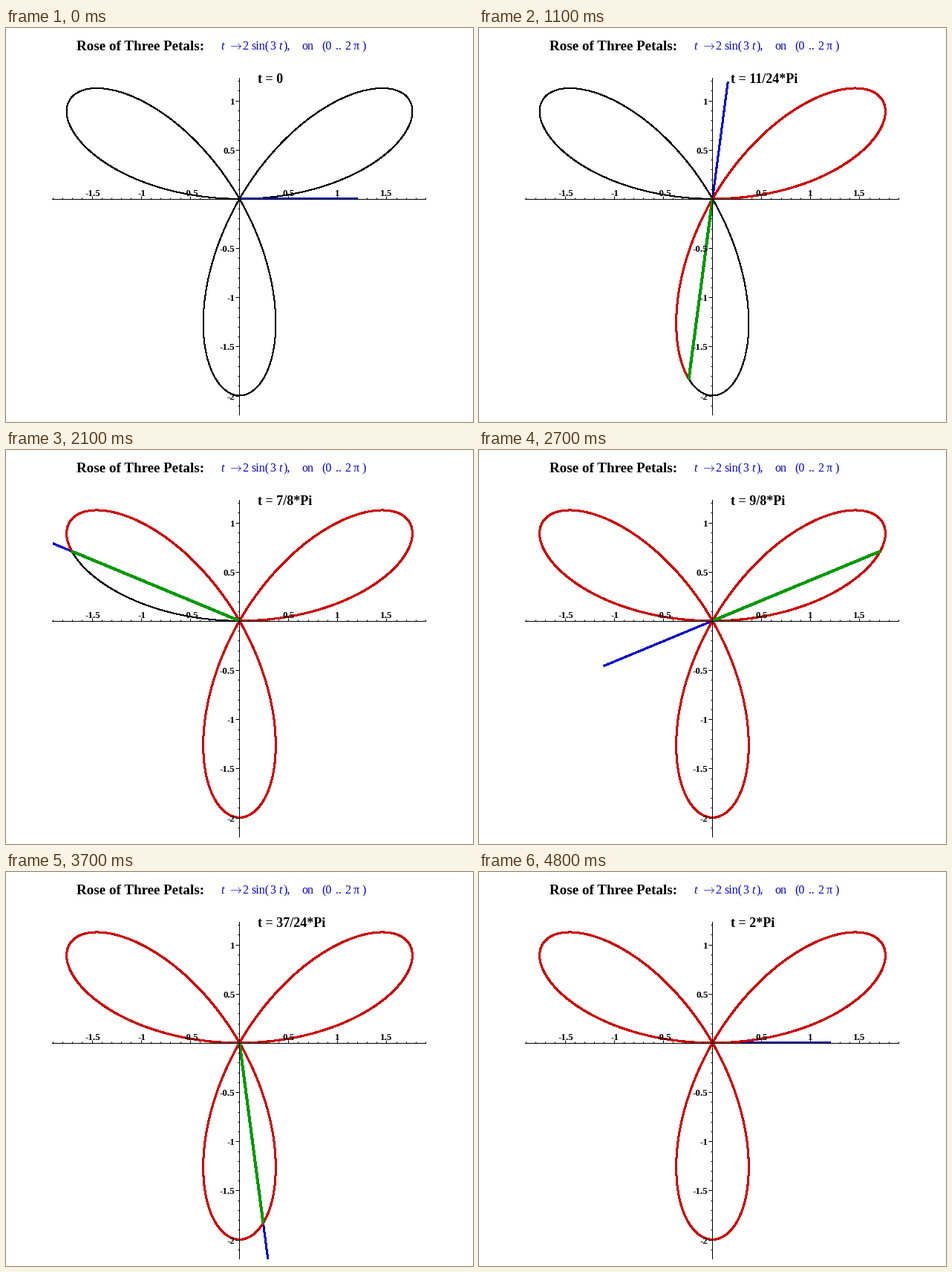
A matplotlib script that plays this animation: 629 px wide and 530 px high, repeating every 4.9 s.

```python
import math

import matplotlib.pyplot as plt
import numpy as np
from matplotlib.animation import FuncAnimation
from matplotlib.patches import Rectangle

W, H, DPI = 629, 530, 64
PT = 72 / DPI                      # points per pixel
CX, CY, UNIT = 314.5, 229.8, 132.3
LEFT, RIGHT, TOP, BOTTOM = 62, 566, 67, 521
STEPS = 24                         # steps per half turn
RED, GREEN, BLUE = "#cc0000", "#009900", "#0000cc"

plt.rcParams.update({
    "font.family": "Liberation Serif",
    "mathtext.fontset": "cm",
})

fig = plt.figure(figsize=(W / DPI, H / DPI), dpi=DPI, facecolor="white")
ax = fig.add_axes([0, 0, 1, 1])
ax.set(xlim=(0, W), ylim=(H, 0))
ax.axis("off")


def radius(t):
    return 2 * np.sin(3 * t)


def to_px(r, t):
    return CX + UNIT * r * np.cos(t), CY - UNIT * r * np.sin(t)


def rose(end):
    t = np.linspace(0, end, 2 + int(end * 100))
    return to_px(radius(t), t)


def stroke(width, color, z):
    # Aliased strokes cover every touched pixel, so they look 1 px wider.
    line, = ax.plot([], [], color=color, lw=width * PT, zorder=z,
                    antialiased=False, snap=False, solid_capstyle="butt",
                    solid_joinstyle="round")
    return line


def label(x, y, s, size, **kw):
    return ax.text(x, y, s, fontsize=size * PT, va="baseline", zorder=7, **kw)


def draw_axes():
    style = dict(color="black", lw=PT, zorder=6, snap=False)
    x0, y0 = 314.5, 230.5
    ax.hlines(y0, LEFT, RIGHT, **style)
    ax.vlines(x0, TOP, BOTTOM, **style)
    for k in range(-21, 20):
        if k == 0:
            continue
        major = k % 5 == 0
        size = 4 if major else 2
        x = round(314 + k * UNIT / 10) + 0.5
        y = round(230 - k * UNIT / 10) + 0.5
        if abs(k) < 20:
            ax.vlines(x, y0 - size, y0, **style)
            if major:
                label(x, 226, f"{k / 10:g}", 13, ha="center", weight="bold")
        if k <= 12:
            ax.hlines(y, x0 - size - major, x0, **style)
            if major:
                label(308.5, y + 4.5, f"{k / 10:g}", 13, ha="right",
                      weight="bold")


def draw_heading():
    label(95, 30, "Rose of Three Petals:", 19, weight="bold")
    parts = [(289, "t"), (299, r"$\rightarrow$"), (318, "2"), (330, "sin("),
             (355, "3"), (367, "t"), (373, "),"), (398, "on"), (425, "(0"),
             (444, ".."), (456, "2"), (468, "π"), (479, ")")]
    for x, s in parts:
        label(x, 29, s, 16, color=BLUE,
              style="italic" if s == "t" else "normal")


def angle_text(k):
    if k == 0:
        return "t = 0"
    g = math.gcd(k, STEPS)
    top, bottom = k // g, STEPS // g
    if bottom > 1:
        return f"t = {top}/{bottom}*Pi"
    return "t = Pi" if top == 1 else f"t = {top}*Pi"


draw_axes()
draw_heading()
outline = stroke(1, "black", 1)
outline.set_data(*rose(math.pi))
ray = stroke(2, BLUE, 2)
trace = stroke(2, RED, 3)
arm = stroke(3, GREEN, 4)
ray.set_clip_path(Rectangle((LEFT + 1, BOTTOM), RIGHT - LEFT - 1, TOP - BOTTOM,
                            transform=ax.transData))
caption = label(339, 74, "", 18, weight="bold")


def update(k):
    t = k * math.pi / STEPS
    r = radius(t)
    tip = to_px(r, t)
    end = to_px(max(1.2, 1.2 * r), t)
    ray.set_data([CX, end[0]], [CY, end[1]])
    arm.set_data([CX, tip[0]], [CY, tip[1]])
    trace.set_data(*rose(t))
    caption.set_text(angle_text(k))
    return ray, trace, arm, caption


anim = FuncAnimation(fig, update, frames=2 * STEPS + 1, interval=100,
                     repeat=True, repeat_delay=0)
plt.show()
```
